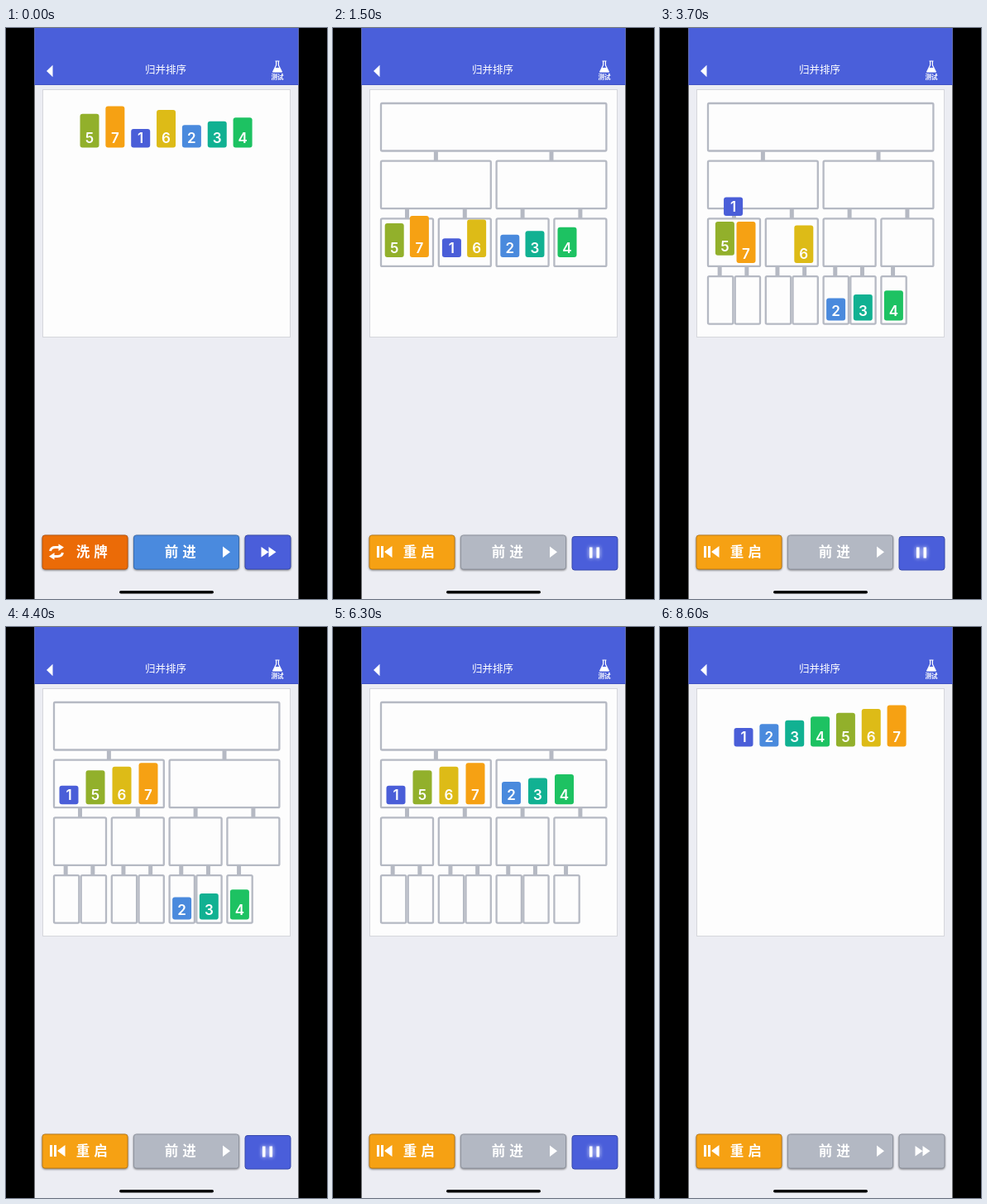
Recreate the animation shown at these times as an HTML page. Size 388 by 690 pixels, loop 9300 ms.

```html
<!DOCTYPE html>
<html lang="zh">
<head>
<meta charset="utf-8">
<title>归并排序</title>
<style>
  html, body { margin: 0; width: 100%; height: 100%; overflow: hidden; background: #000; }
  svg { display: block; width: 388px; height: 690px; }
  text { fill: #fff; text-anchor: middle; font-family: "Noto Sans CJK SC", "Noto Sans CJK", sans-serif; font-weight: 700; }
  .bar text { font: 600 17px Inter, sans-serif; }
  .button text { font-size: 16.5px; }
  .icon { fill: #fff; }
  .box { fill: #fdfdfd; stroke: #b5b9c3; stroke-width: 2.3; }
  .link { fill: #b5b9c3; }
  .button > rect { stroke-width: 1; filter: drop-shadow(.5px 1.5px .8px #0007); }
  .shuffle > rect { fill: #eb6b07; stroke: #b9540a; }
  .restart > rect { fill: #f6a113; stroke: #bd7b12; }
  .step > rect { fill: #4a8ade; stroke: #386bad; }
  .fast > rect, .pause > rect { fill: #4a5eda; stroke: #3648ac; }
  .pause > rect { filter: none; }
  .pause .icon { filter: drop-shadow(0 0 2.5px #fff); }
  [data-mode=run] .step > rect, [data-mode=done] .step > rect,
  [data-mode=done] .fast > rect { fill: #b3b8c3; stroke: #8d929d; }
  [data-mode=idle] .restart, [data-mode=idle] .pause,
  [data-mode=run] .shuffle, [data-mode=run] .fast,
  [data-mode=done] .shuffle, [data-mode=done] .pause { display: none; }
</style>
</head>
<body>
<svg id="stage" viewBox="0 0 388 690" data-mode="idle">
  <rect width="388" height="690"/>
  <rect x="34.5" width="319" height="690" fill="#ecedf3"/>
  <rect x="34.5" width="319" height="69" fill="#4a5fda"/>
  <rect x="34.5" y="68" width="319" height="1" fill="#4052c4"/>
  <path class="icon" d="M49 52l7.5-7.2v14.4z"/>
  <text x="193" y="55.4" font-size="12.5" style="font-weight:500">归并排序</text>
  <path d="M325.5 40h5M326.6 40v5l-4 8h10.8l-4-8v-5" fill="none" stroke="#fff" stroke-width="1.2" stroke-linejoin="round"/>
  <path class="icon" d="M325.2 48h5.6l2.6 5.3h-10.8z"/>
  <text x="328" y="62" font-size="7.6">测试</text>
  <rect x="44.5" y="74.5" width="299" height="299" fill="#fdfdfd" stroke="#d5d6dc"/>
  <g id="tree"></g>
  <g id="bars"></g>

  <g class="button shuffle">
    <rect x="44" y="613" width="103" height="41" rx="3"/>
    <path d="M53.5 632q1-4.5 6-4.5h5M68.5 634q-1 4.5-6 4.5h-5" fill="none" stroke="#fff" stroke-width="3"/>
    <path class="icon" d="M63.5 623.5l6.5 4-6.5 4.5zM58.500 634l-6.500 4.500 6.500 4z"/>
    <text x="93" y="639">洗</text><text x="114.500" y="639">牌</text>
  </g>
  <g class="button restart">
    <rect x="44" y="613" width="103" height="41" rx="3"/>
    <path class="icon" d="M53 626h3v14h-3zM58 626h3v14h-3zM62 633l9.500-7v14z"/>
    <text x="93" y="639">重</text><text x="114.500" y="639">启</text>
  </g>
  <g class="button step">
    <rect x="154.500" y="613" width="127" height="41" rx="3"/>
    <text x="200" y="639">前</text><text x="221.500" y="639">进</text>
    <path class="icon" d="M262 626.500l9 6.700-9 6.700z"/>
  </g>
  <g class="button fast">
    <rect x="289" y="613" width="55" height="41" rx="3"/>
    <path class="icon" d="M308.500 627l9 6.200-9 6.200zM317.500 627l9 6.200-9 6.200z"/>
  </g>
  <g class="button pause">
    <rect x="289" y="614.500" width="55" height="40.500" rx="3"/>
    <path class="icon" d="M310 627.500h3.500v13h-3.500zM318.500 627.500h3.500v13h-3.500z"/>
  </g>
  <rect x="137" y="680" width="114" height="3.600" rx="1.800"/>
</svg>
<script>
const LOOP = 9300, TICK = 100;
const MOVE = 270, STAGGER = 185, PAUSE = 480, FADE = 180;
const SPLITS = [777, 1257, 1737], MERGE_START = 2150, RUN_START = 400;
const ORDER = [5, 7, 1, 6, 2, 3, 4];
const COLORS = ['#4a5ed8', '#4a8add', '#11b192', '#1dc262', '#92b02b', '#ddbb17', '#f6a113'];
const LEVEL_GAP = 69.7;

const stage = document.getElementById('stage');

function add(parent, tag, attrs, text = '') {
  const el = document.createElementNS('http://www.w3.org/2000/svg', tag);
  for (const key in attrs) el.setAttribute(key, attrs[key]);
  el.textContent = text;
  return parent.appendChild(el);
}

// Centre x of slot i on each level of the tree
const slotX = [
  i => 101 + 30.85 * i,
  i => 76 + 139.5 * (i >> 2) + 32 * (i & 3),
  i => 74 + 69.8 * (i >> 1) + 30 * (i & 1),
  i => 73 + 69.8 * (i >> 1) + 32.7 * (i & 1)
];
const slot = (level, i) => ({ x: slotX[level](i), y: 144.5 + LEVEL_GAP * level });

const boxX = [
  () => 58,
  i => 58 + 139.6 * i,
  i => 58 + 69.8 * i,
  i => 58 + 69.8 * (i >> 1) + 32.7 * (i & 1)
];
const boxCount = [1, 2, 4, 7], boxWidth = [272.4, 132.8, 63, 30.3];
const levels = boxCount.map((count, level) => {
  const group = add(document.getElementById('tree'), 'g', {});
  const y = 91 + LEVEL_GAP * level, width = boxWidth[level];
  for (let i = 0; i < count; i++) {
    const x = boxX[level](i), mid = x + width / 2 - (level === 3 ? 1 : 0);
    if (level) add(group, 'rect', { class: 'link', x: mid - 2.5, y: y - 11.5, width: 5, height: 11 });
    add(group, 'rect', { class: 'box', x, y, width, height: 57.5, rx: 1.5 });
  }
  return group;
});

const bars = ORDER.map((value, i) => {
  const el = add(document.getElementById('bars'), 'g', { class: 'bar' });
  const height = 18 + 4.57 * value;
  add(el, 'rect', { x: -11.5, y: -height, width: 23, height, rx: 3, fill: COLORS[value - 1] });
  add(el, 'text', { y: -5.2 }, value);
  const moves = SPLITS.map((time, k) => ({ time, to: slot(k + 1, i) }));
  return { el, value, home: slot(0, i), moves };
});

let clock = MERGE_START;
function planMerge(level, from) {
  const size = 8 >> level;
  if (level < 2) {
    planMerge(level + 1, from);
    planMerge(level + 1, from + size / 2);
  }
  const sorted = bars.slice(from, from + size).sort((a, b) => a.value - b.value);
  sorted.forEach((bar, k) => bar.moves.push({ time: clock + k * STAGGER, to: slot(level, from + k) }));
  clock += (sorted.length - 1) * STAGGER + PAUSE;
}
planMerge(0, 0);
const DONE = clock;
const shown = [320, ...SPLITS];

const ramp = (t, start, length) => Math.min(1, Math.max(0, (t - start) / length));

function render(t) {
  stage.dataset.mode = t < RUN_START ? 'idle' : t < DONE ? 'run' : 'done';
  levels.forEach((group, k) => {
    group.setAttribute('opacity', ramp(t, shown[k], FADE) * (1 - ramp(t, DONE, FADE)));
  });
  for (const { el, home, moves } of bars) {
    let { x, y } = home;
    for (const { time, to } of moves) {
      const p = ramp(t, time, MOVE);
      x += (to.x - x) * p;
      y += (to.y - y) * p;
    }
    el.setAttribute('transform', `translate(${x} ${y})`);
  }
}

const begin = performance.now();
function frame() {
  const t = (performance.now() - begin) % LOOP;
  render(Math.floor(t / TICK) * TICK);
  requestAnimationFrame(frame);
}
frame();
</script>
</body>
</html>
```
